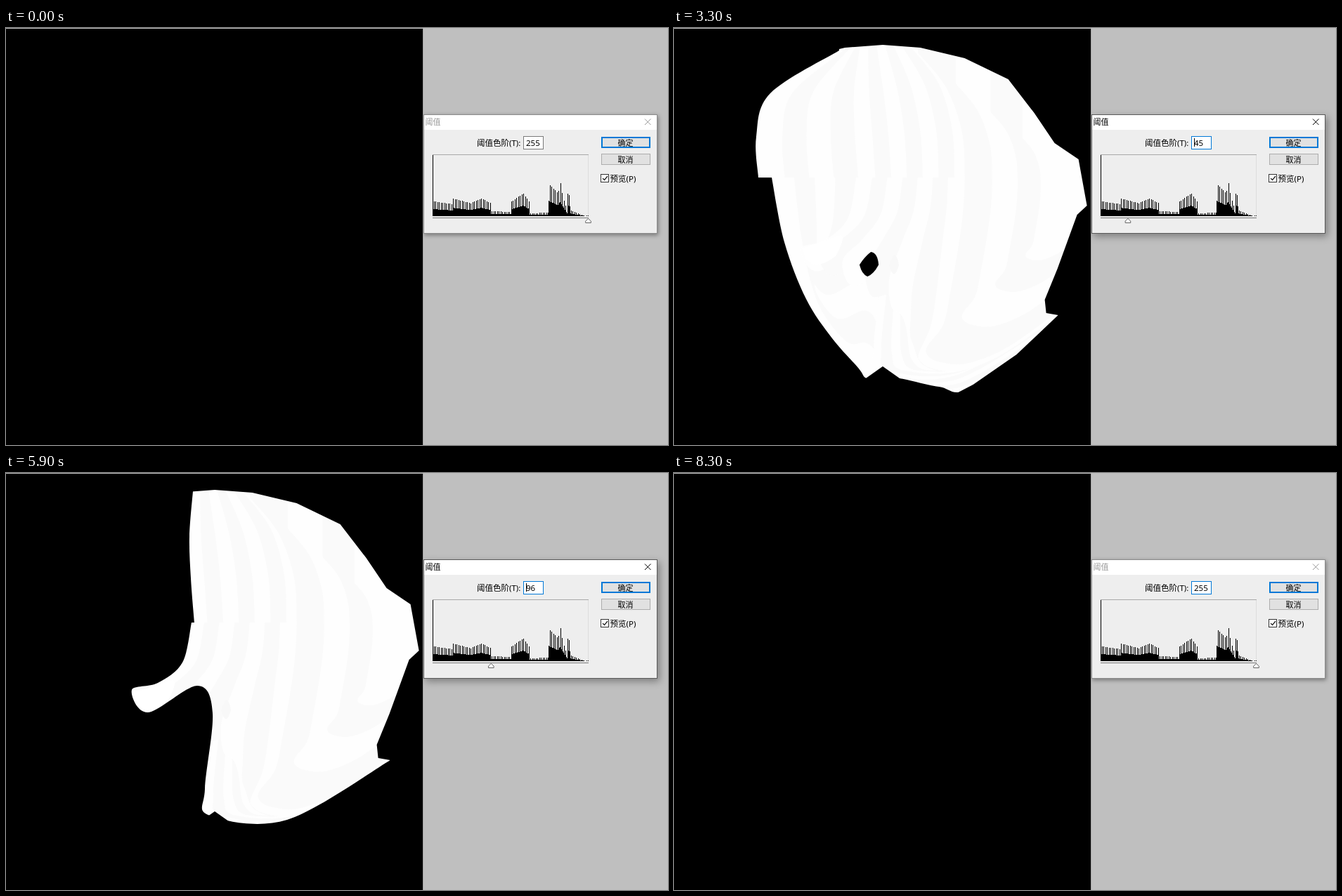
An HTML page that plays this animation: 942x594 px, repeating every 8400 ms.

```html
<!DOCTYPE html>
<html lang="zh-CN">
<head>
<meta charset="utf-8">
<title>阈值</title>
<style>
  html, body { margin: 0; width: 100%; height: 100%; overflow: hidden; background: #bfbfbf; }
  svg { position: absolute; left: 0; top: 0; }
  text { font: 11.5px "Noto Sans", "Noto Sans CJK SC", "Noto Sans CJK", sans-serif; }
  .small { font-size: 11px; }
  .crisp { shape-rendering: crispEdges; }
  #shadow { position: absolute; left: 594px; top: 123px; width: 333px; height: 170px;
    box-shadow: 1px 2px 6px rgba(0,0,0,.4); }
  .on #shadow { box-shadow: 3px 4px 10px rgba(0,0,0,.34); }
  #frame { fill: #8c8c8c; }
  .on #frame { fill: #5a5a5a; }
  #title { fill: #999; }
  .on #title { fill: #000; }
  #cross { stroke: #999; }
  .on #cross { stroke: #000; }
  #field { fill: #fff; stroke: #7a7a7a; }
  .focus #field { stroke: #0078d7; }
</style>
</head>
<body>
<div id="shadow"></div>
<svg width="942" height="594" viewBox="0 0 942 594">
  <defs>
    <path id="almond" d="M0-1Q.7-.95 1 .05Q.6 .85 0 1Q-.6 .85-1 .05Q-.6-.6 0-1Z"/>
    <clipPath id="face"><path id="outline"/></clipPath>
    <clipPath id="lit" clip-path="url(#face)">
      <path id="light"/>
      <use id="drop" href="#almond"/>
    </clipPath>
  </defs>

  <rect class="crisp" y="1" width="593" height="593"/>
  <rect class="crisp" x="593" y="1" width="1" height="593" fill="#a0a0a0"/>
  <g clip-path="url(#lit)">
    <rect width="593" height="594" fill="#fff"/>
    <g id="bands"></g>
    <path d="M182 314L238 295Q244 300 230 325Q203 346 188 330Z" fill="#fff"/>
    <use href="#almond" transform="translate(313 337) scale(7 14)" fill="#f8f8f8"/>
  </g>
  <use id="hole" href="#almond"/>

  <g class="crisp">
    <rect id="frame" x="594" y="123" width="333" height="170"/>
    <rect x="595" y="124" width="331" height="21" fill="#fff"/>
    <rect x="595" y="145" width="331" height="147" fill="#eee"/>
    <rect id="hover" x="897" y="124" width="29" height="21" fill="#e81123"/>
    <rect x="607" y="180" width="222" height="1" fill="#a8a8a8"/>
    <rect x="828" y="181" width="1" height="87" fill="#ddd"/>
    <rect x="607" y="270" width="222" height="1" fill="#777"/>
    <path id="bars"/>
    <rect id="field" x="736.5" y="154.5" width="28" height="18"/>
    <rect x="848" y="156" width="68" height="14" fill="#e1e1e1" stroke="#0078d7" stroke-width="2"/>
    <rect x="847.5" y="179.5" width="69" height="15" fill="#e1e1e1" stroke="#adadad"/>
    <rect x="846.5" y="208.5" width="11" height="11" fill="#fff" stroke="#333"/>
    <rect id="caret" x="740" y="157" width="1" height="12"/>
  </g>
  <path d="M849 214L851.5 216.5L856 211" fill="none" stroke="#222" stroke-width="1.2"/>
  <path id="cross" d="M909 129.500L917.500 138M917.500 129.500L909 138"/>
  <text id="title" class="small" x="596.500" y="137.500">阈值</text>
  <text x="670" y="167.500">阈值色阶(T):</text>
  <text id="value" x="740" y="167.500">255</text>
  <text class="small" x="881.500" y="168" text-anchor="middle">确定</text>
  <text class="small" x="881.500" y="192" text-anchor="middle">取消</text>
  <text x="859.500" y="218.500">预览(P)</text>
  <path id="knob" d="M0 271.500L3.800 275V277.500H-3.800V275Z" fill="#fff" stroke="#666"/>
</svg>
<script>
const $ = id => document.getElementById(id);
const set = (id, name, value) => $(id).setAttribute(name, value);
const pts = s => s.split(' ').map(p => p.split(',').map(Number));
const mix = (a, b, k) => a + (b - a) * k;
const mixPts = (a, b, k) => a.map((p, i) => [mix(p[0], b[i][0], k), mix(p[1], b[i][1], k)]);

// The head is symmetric about x = 297
const half = pts('296.4,24 350,28 413,43 475,73 512,121 541,164 575,187 587,253 573,266 ' +
  '545,343 527,387 529,406 546,409 487,465 425,508 400,521 377,539 296.4,482')
  .map(([x, y]) => [x + .6, y]);
set('outline', 'd', 'M' + [...half, ...half.map(([x, y]) => [594 - x, y]).reverse()].join('L') + 'Z');

// Edge of the light at a few levels: above and below the seam at y = 213
const edges = [
  [25, '118,73 91,112 78,162 74,213',
    '63,213 85,303 122,403 160,447 217,485 243,492 234,514 212,534 217,560 420,560 600,409'],
  [45, '235,32 137,93 117,155 120,213',
    '139,213 157,305 188,386 225,442 262,484 272,498 285,500 320,499 377,511 425,512 560,420'],
  [96, '266,26 261,90 263,150 268,213',
    '264,213 251,270 216,299 179,309 202,341 272,303 294,342 283,450 290,488 400,494 547,409'],
  [166, '338,28 377,80 396,146 399,213',
    '390,213 388,255 382,305 373,380 365,425 349,462 350,474 368,485 410,488 470,463 547,409'],
  [176, '338,28 380,80 403,146 407,213',
    '407,213 405,255 399,305 386,380 375,430 352,461 352,475 370,485 410,487 470,463 547,409']
].map(([level, ...arcs]) => ({ level, arcs: arcs.map(pts) }));

function arcsAt(v) {
  const first = edges[0], last = edges[edges.length - 1];
  if (v <= first.level) {  // spreads outward
    const s = 1 + (first.level - v) * .01;
    return first.arcs.map(a => a.map(([x, y]) => [297 + (x - 297) * s, y]));
  }
  if (v > last.level) {  // shrinks into the right tip
    const k = 1 - Math.max(0, (252 - v) / (252 - last.level)) ** 1.4;
    return last.arcs.map(a => a.map(([x, y]) => [mix(x, 592, k), mix(y, 235, k)]));
  }
  const i = edges.findIndex(e => e.level >= v);
  const a = edges[i - 1], b = edges[i];
  const k = (v - a.level) / (b.level - a.level);
  return a.arcs.map((arc, n) => mixPts(arc, b.arcs[n], k));
}

// Catmull-Rom curve as Bezier segments
function curve(p) {
  const at = i => p[Math.max(0, Math.min(p.length - 1, i))];
  let d = p[0].join();
  for (let i = 0; i < p.length - 1; i++) {
    const handle = (n, dir) => at(n).map((c, k) => c + dir * (at(n + 1)[k] - at(n - 1)[k]) / 6);
    d += 'C' + [handle(i, 1), handle(i + 1, -1), p[i + 1]].join(' ');
  }
  return d;
}

function lightPath(v) {
  if (v >= 252) return '';
  const [top, low] = arcsAt(v);
  return `M${curve(top)}L${curve(low)}H600V0H${top[0][0]}Z`;
}

// Faint steps of tone along the same edges
for (let v = 34, grey = true; v < 220; v += 12, grey = !grey) {
  const band = document.createElementNS('http://www.w3.org/2000/svg', 'path');
  band.setAttribute('d', lightPath(v));
  band.setAttribute('fill', grey ? '#fafafa' : '#fefefe');
  $('bands').append(band);
}

// Histogram ramps: [end x, first height, last height], with a comb of full-height bars
let x = 608, bars = 'M607 181h1v87h-1z';
for (const [end, h0, h1] of [[636, 21, 17], [662, 25, 18], [676, 19, 25], [690, 25, 18], [719, 7, 6],
  [737, 21, 33], [745, 30, 20], [772, 4, 5], [786, 46, 32], [790, 36, 50], [799, 36, 5],
  [803, 32, 28], [823, 8, 0]]) {
  for (const from = x; x < end; x++) {
    const h = mix(h0, h1, (x - from) / (end - from));
    const tall = x % 5 == 1 || x % 5 == 4;
    const px = Math.max(1, Math.round(tall ? h : h * .47));
    bars += `M${x} ${268 - px}h1v${px}h-1z`;
  }
}
set('bars', 'd', bars + 'M826 267h1v1h-1zM828 267h1v1h-1z');

// Slider drag: [ms, level]
const drag = [[0, 255], [700, 255], [1500, 232], [2200, 176], [2400, 168], [3300, 45], [4100, 3],
  [4500, 3], [4900, 25], [5900, 96], [6500, 166], [7200, 245], [7500, 255], [8400, 255]];

function levelAt(t) {
  const i = Math.max(1, drag.findIndex(d => d[0] >= t));
  const [t0, v0] = drag[i - 1], [t1, v1] = drag[i];
  return Math.round(mix(v0, v1, (t - t0) / (t1 - t0)));
}

function draw(now) {
  const t = Math.floor(now % 8400 / 100) * 100;
  const v = levelAt(t);

  set('light', 'd', lightPath(v));
  const drop = v < 129 ? 0 : Math.max(0, 10.5 + (176 - v) * .2);
  set('drop', 'transform', `translate(313.5 335.7) scale(${drop} ${drop * 1.58})`);
  const hole = v > 85 ? 0 : 8 + v * .125;
  set('hole', 'transform', `translate(277.7 336.5) skewX(-8) scale(${hole} ${hole * 1.28})`);

  $('value').textContent = v;
  set('knob', 'transform', `translate(${606.8 + v * .8696})`);
  $('caret').style.opacity = t >= 700 && t < 7900 ? 1 : 0;
  $('hover').style.opacity = t == 7700 ? 1 : t == 7800 ? .5 : 0;
  document.body.className = (t >= 700 && t < 8200 ? 'on ' : '') + (t >= 700 ? 'focus' : '');
}

const start = performance.now();
function tick() {
  draw(performance.now() - start);
  requestAnimationFrame(tick);
}
tick();
</script>
</body>
</html>
```
